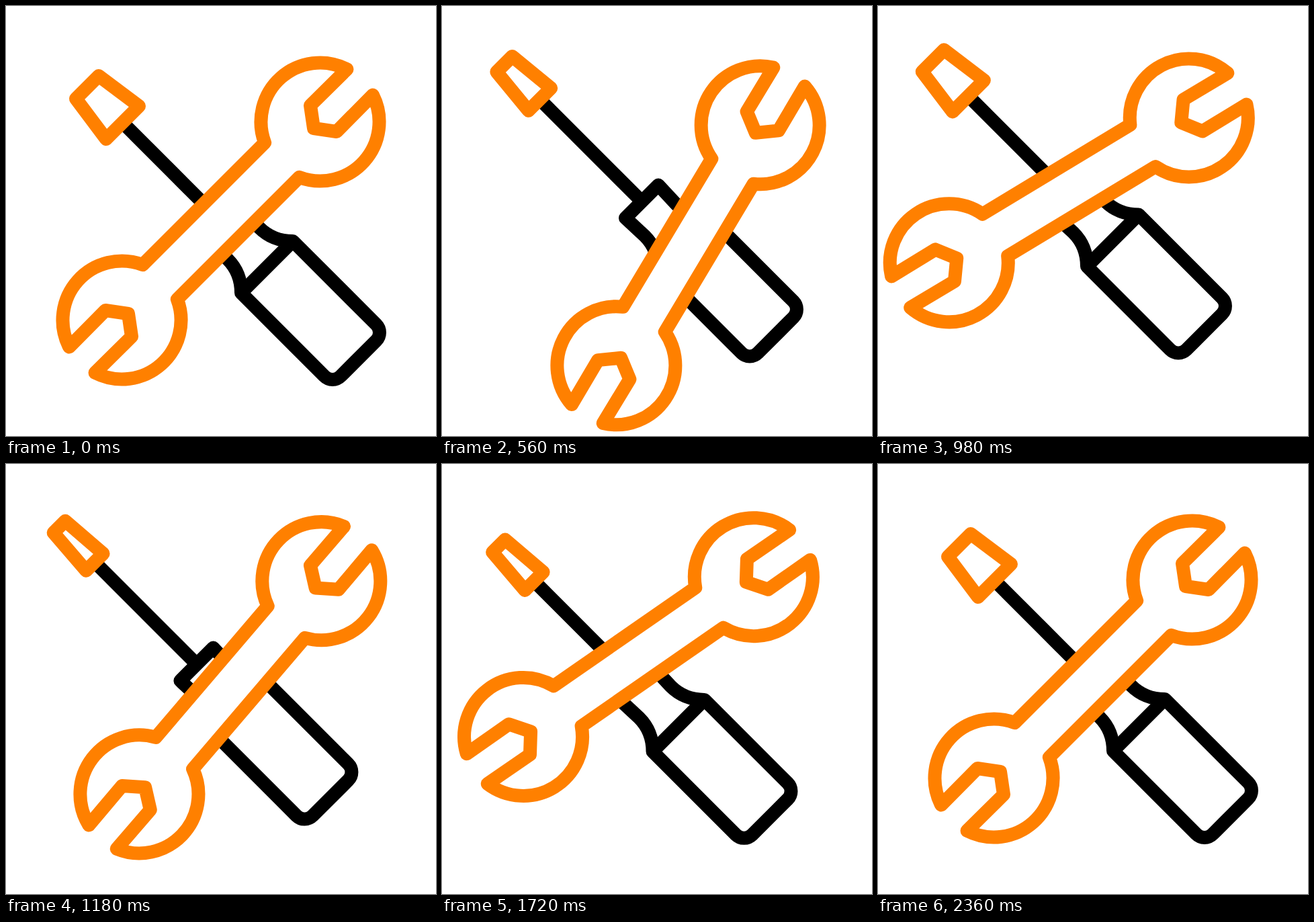
Write an HTML page that moves like this. It is 640 px wide and 640 px high and loops after 2.4 s.

```html
<!DOCTYPE html>
<html lang="en">
<head>
<meta charset="utf-8">
<title>Tools</title>
<style>
html, body { margin: 0; width: 100%; height: 100%; overflow: hidden; background: #fff; }
svg { display: block; width: 100%; height: 100%; }
path { fill: #fff; stroke-width: 20; stroke-linejoin: round; }
.dark { stroke: #000; }
.warm { stroke: #ff8000; }
</style>
</head>
<body>
<svg viewBox="0 0 640 640">
  <g id="driver">
    <path class="dark" d="M172 172L326 326"/>
    <path class="dark" d="M350 301L377 330Q397 350 427 350L551 474A17 17 0 0 1 551 498L498 551A17 17 0 0 1 474 551L350 427Q350 397 330 377L301 350Z"/>
    <path class="dark" d="M350 427L427 350"/>
    <path class="warm" id="blade"/>
  </g>
  <path class="warm" id="wrench"/>
</svg>
<script>
const LOOP = 2400;
const FIRST = 517; // length of the first stroke; the others last one beat
const RAD = Math.PI / 180;
const driver = document.getElementById('driver');
const blade = document.getElementById('blade');
const wrench = document.getElementById('wrench');

// One half of the wrench; the other is the same half turned about the middle.
function wrenchPath() {
  const r = 88, cx = 467.5, cy = 172.5;
  const onHead = deg => [cx + r * Math.cos(deg * RAD), cy + r * Math.sin(deg * RAD)];
  const half = turn => {
    const at = ([x, y]) => turn ? `${640 - x} ${640 - y}` : `${x} ${y}`;
    const [neckIn, tipIn, tipOut, neckOut] = [110.6, -27, -63, 159.4].map(a => at(onHead(a)));
    const arc = `A${r} ${r} 0 0 0 `;
    const jaw = [[492, 187], [458, 182], [453, 148]].map(at).join('L');
    return `${neckIn}${arc}${tipIn}L${jaw}L${tipOut}${arc}${neckOut}`;
  };
  return `M${half(false)}L${half(true)}Z`;
}

// Narrows the blade across its 45 degree axis.
function bladePath(width) {
  const corner = (sum, diff) => `${(sum + diff * width) / 2} ${(sum - diff * width) / 2}`;
  return `M${corner(242, 34)}L${corner(242, -34)}L${corner(347, -49)}L${corner(347, 49)}Z`;
}

// Eased strokes from rest through each pose and back to rest.
function strokes(poses, beat, t) {
  const pos = t < FIRST ? t / FIRST : 1 + (t - FIRST) / beat;
  const i = Math.floor(pos), p = pos - i;
  const from = poses[i - 1] || 0, to = poses[i] || 0;
  return from + (to - from) * p * p * (3 - 2 * p);
}

// Blade width: four wobbles with a slight lead, then still.
function bladeWidth(t) {
  const u = Math.min(t / 2040, 1);
  const deg = 1440 * u + 60 * Math.sin(Math.PI * u) + 25 * Math.sin(2 * Math.PI * u);
  return 0.75 + 0.25 * Math.cos(deg * RAD);
}

function draw(t) {
  const angle = strokes([-15, 15, -15, 10.9], 414, t);
  const x = strokes([-27.7, -38.9, -43.2, -36.1], 420, t);
  const y = strokes([-34.3, -40.1, -19.6, 2], 420, t);
  wrench.setAttribute('transform', `rotate(${angle} 490 150)`);
  driver.setAttribute('transform', `translate(${x} ${y})`);
  blade.setAttribute('d', bladePath(bladeWidth(t)));
}

let start = null;
function tick(now) {
  if (start === null) start = now;
  draw((now - start) % LOOP);
  requestAnimationFrame(tick);
}
wrench.setAttribute('d', wrenchPath());
draw(0);
requestAnimationFrame(tick);
</script>
</body>
</html>
```
